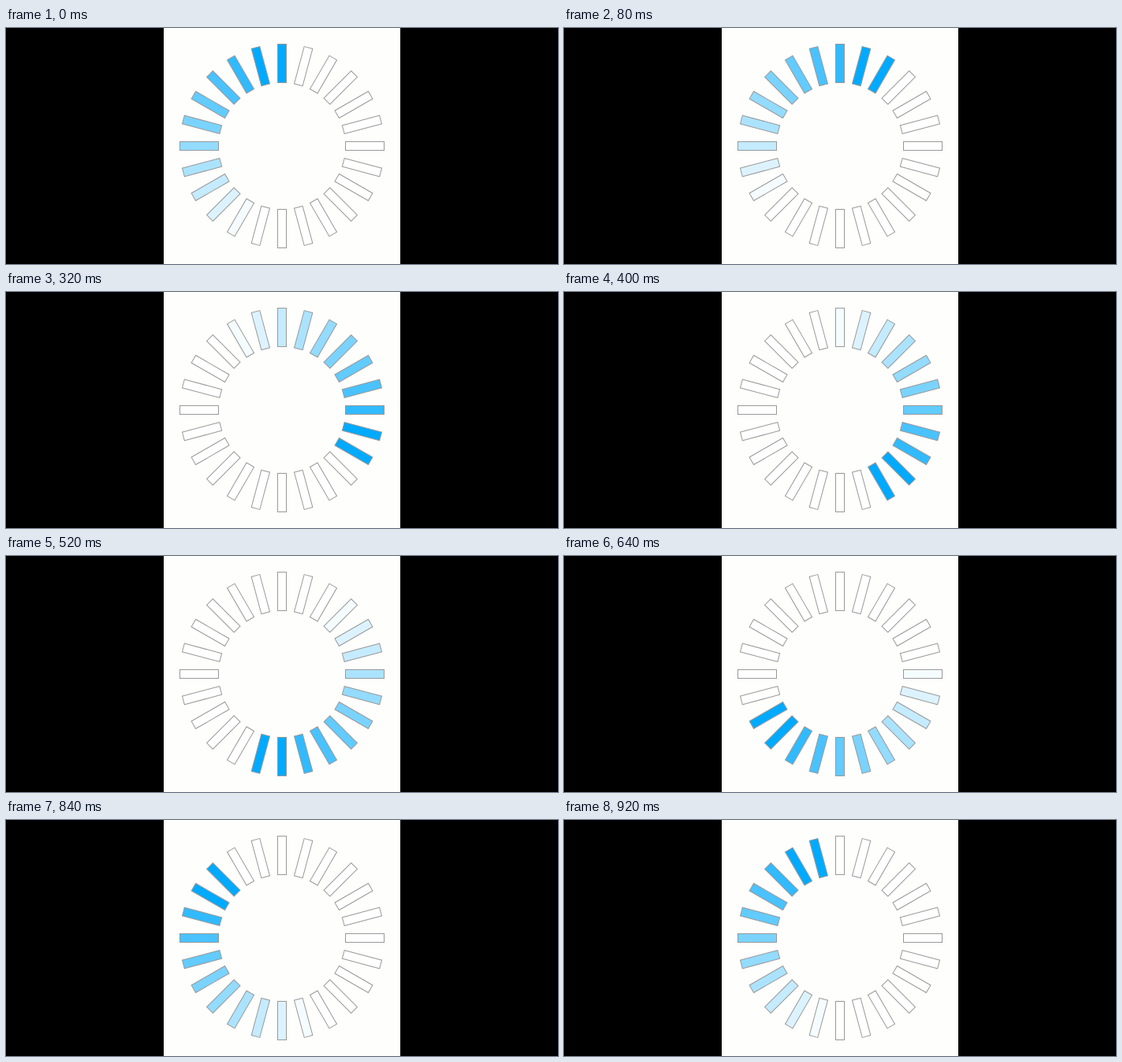
Animation, 700 px wide and 300 px high, one loop 960 ms. Source, as an HTML page:

```html
<!DOCTYPE html>
<html>
<head>
<meta charset="utf-8">
<title>Spinner</title>
<style>
  html, body { margin: 0; width: 100%; height: 100%; overflow: hidden; background: #000; }
  svg { display: block; }
</style>
</head>
<body>
<svg width="700" height="300" viewBox="0 0 700 300">
  <rect x="200" width="300" height="300" fill="#fefefc"/>
  <g id="ring" transform="translate(350 150)" stroke="#999"></g>
</svg>
<script>
const COUNT = 24, STEP_MS = 40, TRAIL = 11;
const ring = document.getElementById('ring');

const bars = Array.from({ length: COUNT }, (_, i) => {
  const bar = document.createElementNS('http://www.w3.org/2000/svg', 'rect');
  const attrs = { x: -5.5, y: -129.5, width: 11, height: 49, transform: `rotate(${i * 360 / COUNT})` };
  for (const name in attrs) bar.setAttribute(name, attrs[name]);
  return ring.appendChild(bar);
});

// The two leading bars are solid; the rest of the trail fades to white.
function trailColor(age) {
  if (age >= TRAIL) return '#fff';
  const fade = age < 2 ? 0 : age * 0.096;
  return `rgb(${Math.round(255 * fade)}, ${Math.round(170 + 85 * fade)}, 255)`;
}

function draw() {
  const head = Math.floor(performance.now() / STEP_MS) % COUNT;
  bars.forEach((bar, i) => bar.setAttribute('fill', trailColor((head - i + COUNT) % COUNT)));
  requestAnimationFrame(draw);
}
draw();
</script>
</body>
</html>
```
